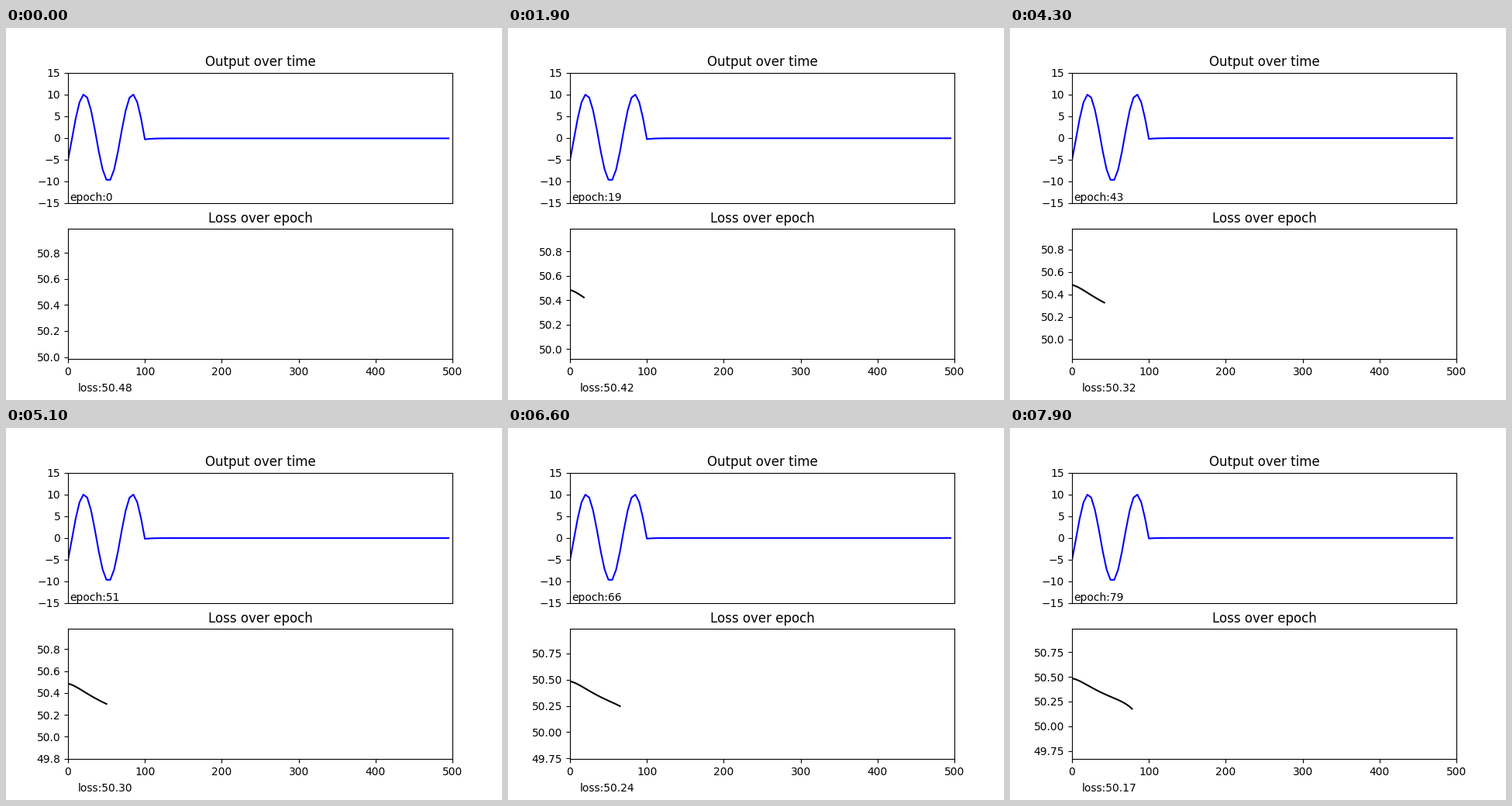
A matplotlib script that plays this animation: 640 px wide and 480 px high, repeating every 8000 ms.

```python
import numpy as np
import matplotlib.pyplot as plt
from matplotlib.animation import FuncAnimation

FRAMES, INTERVAL = 80, 100
SEED_END = 100  # the known wave stops here, the prediction follows

plt.rcParams["font.family"] = "DejaVu Sans"

x = np.arange(0, 500, 5)
wave = 10 * np.sin(x / 10 - 0.54)

# Smooth loss curve through a few (epoch, loss - 50) points
knots = np.array([
    (0, 0.484), (5, 0.474), (10, 0.456), (18, 0.4235), (31, 0.3695),
    (43, 0.3225), (58, 0.273), (66, 0.243), (73, 0.209), (79, 0.168),
])
epochs = np.arange(FRAMES)
fit = np.polynomial.Polynomial.fit(knots[:, 0], knots[:, 1], 6)
loss = 50 + fit(epochs)


def output(epoch):
    """Known wave, then a prediction that settles close to zero."""
    p = epoch / (FRAMES - 1)
    level = -0.14 + 0.10 * p
    dip = -0.24 + 0.11 * p
    tail = level + dip * np.exp(-(x - SEED_END) / 9)
    return np.where(x < SEED_END, wave, tail)


fig, (top, bottom) = plt.subplots(2, 1, figsize=(6.4, 4.8), dpi=100)

top.set_title("Output over time")
top.set(xlim=(0, 500), ylim=(-15, 15), xticks=[])
top.set_yticks(range(-15, 16, 5))
bottom.set_title("Loss over epoch")
bottom.set_xlim(0, 500)

out_line, = top.plot([], [], color="b", lw=1.5)
loss_line, = bottom.plot([], [], color="k", lw=1.5)
epoch_text = top.text(2.5, -14.5, "")
loss_text = fig.text(93 / 640, 11 / 480, "")


def update(epoch):
    out_line.set_data(x, output(epoch))
    loss_line.set_data(epochs[:epoch], loss[:epoch])
    bottom.set_ylim(loss[epoch] - 0.5, loss[0] + 0.5)
    epoch_text.set_text(f"epoch:{epoch}")
    loss_text.set_text(f"loss:{loss[epoch]:.2f}")
    return out_line, loss_line, epoch_text, loss_text


anim = FuncAnimation(fig, update, frames=FRAMES, interval=INTERVAL,
                     init_func=lambda: update(0), repeat=True, repeat_delay=0)
plt.show()
```
